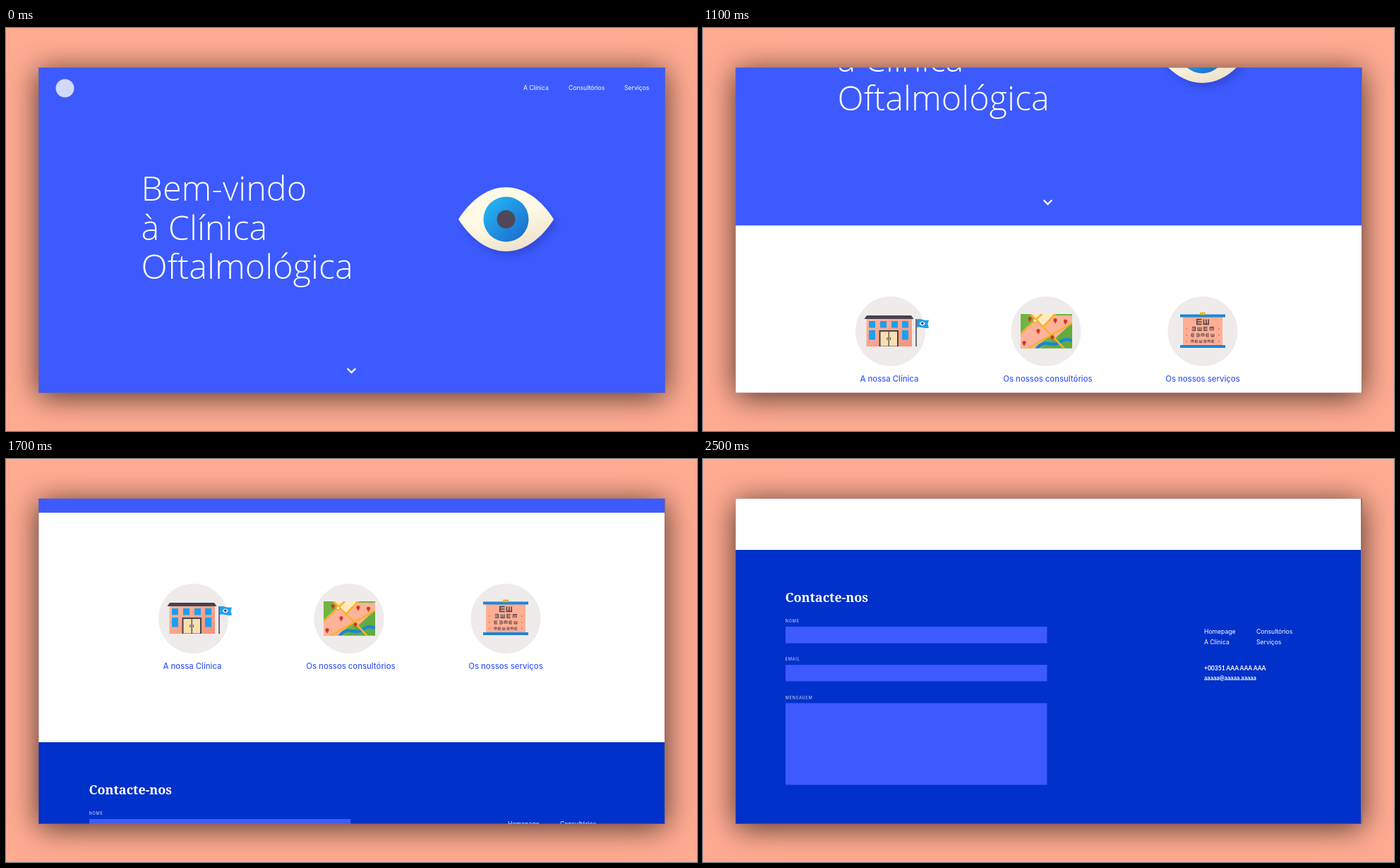
Animation, 979 px wide and 572 px high, one loop 3000 ms. Source, as an HTML page:

```html
<!DOCTYPE html>
<html lang="pt">
<head>
<meta charset="utf-8">
<title>Clínica Oftalmológica</title>
<style>
  html, body { margin: 0; width: 100%; height: 100%; overflow: hidden; background: #ffab91; }
  .window {
    position: absolute; left: 46px; top: 56px; width: 888px; height: 461.5px;
    background: #a87060; box-shadow: 0 5px 40px rgba(0, 0, 0, .7);
  }
  .view { position: absolute; inset: 0; overflow: hidden; }
  .view::after { content: ""; position: absolute; inset: 0; box-shadow: inset 0 0 0 1px rgba(150, 105, 95, .4); }
  .page {
    position: absolute; top: 0; left: 0; display: block;
    font-family: Inter, sans-serif; fill: #fff; animation: scroll 3s infinite;
  }
  @keyframes scroll {
    0%, 16.66% { top: 0; left: 0; animation-timing-function: steps(21, jump-start); }
    86.66%, 100% { top: -716px; left: -2px; }
  }
  .title { font: 300 48.5px "Open Sans", sans-serif; }
  .link { font-size: 8.6px; }
  .caption { font-size: 11.3px; font-weight: 500; fill: #3d5afe; text-anchor: middle; }
  .heading { font: 700 18px "Noto Serif", serif; }
  .label { font-size: 5.8px; letter-spacing: .65px; fill-opacity: .8; }
  .contact { font: 700 8.5px Lato, sans-serif; }
</style>
</head>
<body>
<div class="window"><div class="view">
<svg class="page" width="888" height="1178" viewBox="46 56 888 1178">
  <defs>
    <linearGradient id="white" x1=".3" y1="0" x2=".75" y2="1">
      <stop offset=".45" stop-color="#fffae6"/><stop offset="1" stop-color="#ecdfc6"/>
    </linearGradient>
    <linearGradient id="iris" x1=".1" y1=".1" x2=".9" y2=".9">
      <stop offset="0" stop-color="#22b4f4"/><stop offset="1" stop-color="#1c6fcd"/>
    </linearGradient>
    <linearGradient id="wall" x1="0" y1="0" x2="1" y2="1">
      <stop offset="0" stop-color="#ffb79f"/><stop offset="1" stop-color="#f4937c"/>
    </linearGradient>
    <filter id="soft" x="-20%" y="-20%" width="140%" height="150%"><feGaussianBlur stdDeviation="4.5"/></filter>
    <clipPath id="sheet"><rect x="450" y="202" width="73" height="48.5"/></clipPath>
    <path id="lens" d="M641 271.5C658 244.500 682 226 708.500 226S759 244.500 776 271.500C759 298.500 735 317 708.500 317S658 298.500 641 271.500Z"/>
    <path id="pin" d="M0 4C-1.200 1.500-2.700.500-2.700-1.200a2.700 2.700 0 0 1 5.400 0C2.700.500 1.200 1.500 0 4Z"/>
    <path id="glyph" d="M1-1H-1V1H1M-1 0H1" fill="none" stroke="#50444c" stroke-width=".48"/>
  </defs>

  <rect x="46" y="56" width="888" height="1178" fill="#fff"/>

  <rect x="46" y="56" width="888" height="463" fill="#3d5afe"/>
  <rect x="46" y="519" width="888" height="1" fill="#c9cde0"/>
  <circle cx="83.5" cy="85.500" r="13" fill="#d3d9f8"/>
  <g class="link">
    <text x="733" y="87.500">A Clínica</text>
    <text x="797" y="87.500">Consultórios</text>
    <text x="876" y="87.500">Serviços</text>
  </g>
  <g class="title">
    <text x="191.500" y="245">Bem-vindo</text>
    <text x="191.500" y="300.500">à Clínica</text>
    <text x="191.500" y="356">Oftalmológica</text>
  </g>
  <use href="#lens" x="5" y="7" fill="#1a2a98" opacity=".3" filter="url(#soft)"/>
  <use href="#lens" fill="url(#white)"/>
  <circle cx="708.500" cy="271.500" r="32" fill="url(#iris)"/>
  <circle cx="708.500" cy="271.500" r="13" fill="#50485a"/>
  <path d="M483.700 483.200L489.500 489L495.300 483.200" fill="none" stroke="#fff" stroke-width="2.300"/>

  <g transform="translate(1 443)">
    <g fill="#efebea">
      <circle cx="265.500" cy="226.500" r="49.500"/>
      <circle cx="486" cy="226.500" r="49.500"/>
      <circle cx="708" cy="226.500" r="49.500"/>
    </g>

    <path d="M231.500 208H296V248H231.500Z" fill="url(#wall)"/>
    <path d="M232 204H295L298.500 209H228.500Z" fill="#47424f"/>
    <g id="panes" fill="#1d9ff0"></g>
    <path d="M249.500 225H277V248H249.500Z" fill="#47424f"/>
    <path d="M251.500 227H262.600V247.500H251.500ZM263.900 227H275V247.500H263.900Z" fill="#f7dfb0"/>
    <path d="M261 235v4M265.500 235v4" stroke="#47424f"/>
    <path d="M302 209V248" stroke="#47424f" stroke-width="1.500"/>
    <path d="M303 209.500C309 207.500 313 212.500 320 210.200L318.500 216L320 221.500C313 223.500 309 219 303 221Z" fill="#1d9ff0"/>
    <path d="M306.500 215.500Q310.800 209.500 315 215.500Q310.800 221 306.500 215.500Z" fill="#fff"/>
    <circle cx="310.800" cy="215.300" r="1.700" fill="#38404e"/>

    <g clip-path="url(#sheet)">
      <rect x="450" y="202" width="73" height="49" fill="#6fb544"/>
      <path d="M474 208L495 229L470 251H450V232Z" fill="#fcb39a"/>
      <path d="M473 214L482 204H523V214L497 238Z" fill="#fcb39a"/>
      <path d="M464 202H497L482 220Z" fill="#fdeac0"/>
      <path d="M498 238L523 216V251H478Z" fill="#62ab3e"/>
      <path d="M472 252C484 235 494 250 504 243S515 238 525 240" fill="none" stroke="#1b86d8" stroke-width="4.500"/>
      <g fill="none" stroke="#fbb02d" stroke-width="2.600">
        <path d="M448 232L480 202M464 202L513 252M456 253L526 213M481 221L500 201"/>
      </g>
      <circle cx="470.500" cy="211.500" r="2.500" fill="#fff0cc" stroke="#fbb02d" stroke-width="1.500"/>
    </g>
    <g id="pins" fill="#dc4428"></g>

    <rect x="680" y="205" width="56" height="42" fill="#ffae94"/>
    <path d="M676 202.500H740V206.500H676ZM676 246H740V250H676Z" fill="#1b86d8"/>
    <rect x="704" y="199.500" width="8" height="3.800" rx="1" fill="#e5b81f"/>
    <g id="chart"></g>

    <g class="caption">
      <text x="264" y="298">A nossa Clínica</text>
      <text x="488.500" y="298">Os nossos consultórios</text>
      <text x="708" y="298">Os nossos serviços</text>
    </g>
  </g>

  <rect x="46" y="845" width="888" height="389" fill="#0031ca"/>
  <g transform="translate(2 716)">
    <text class="heading" x="116.500" y="202.500">Contacte-nos</text>
    <g class="label">
      <text x="116.500" y="232">NOME</text>
      <text x="116.500" y="286.300">EMAIL</text>
      <text x="116.500" y="340.500">MENSAGEM</text>
    </g>
    <path d="M117 238H487.500V261.500H117ZM117 292.300H487.500V315.500H117ZM117 346.500H487.500V462.500H117Z" fill="#3d5afe"/>
    <g class="link">
      <text x="710" y="247.500">Homepage</text>
      <text x="784" y="247.500">Consultórios</text>
      <text x="710" y="262.500">A Clínica</text>
      <text x="784" y="262.500">Serviços</text>
    </g>
    <g class="contact">
      <text x="710" y="300">+00351 AAA AAA AAA</text>
      <text x="710" y="314.300">aaaaa@aaaaa.aaaaa</text>
    </g>
  </g>
</svg>
</div></div>
<script>
  const fill = (id, parts) => { document.getElementById(id).innerHTML = parts.join(''); };

  const pane = (x, y, h) => `<rect x="${x}" y="${y}" width="9" height="${h}"/>`;
  fill('panes', [
    ...[235, 251, 267, 282].map(x => pane(x, 212, 9.5)),
    ...[235, 282].map(x => pane(x, 225, 13.5))
  ]);

  const pins = [[463, 210], [499, 212], [513.5, 213.5], [475, 227], [495, 236], [455, 244]];
  fill('pins', pins.map(([x, y]) =>
    `<use href="#pin" x="${x}" y="${y}"/><circle cx="${x}" cy="${y - 1.2}" r=".9" fill="#7c2a20"/>`));

  // Eye chart: one letter shape turned four ways.
  const turn = { E: 0, M: 90, A: 180, W: 270 };
  const rows = [['EW', 213, 3.4, 9.6], ['AWEM', 223, 2.4, 8.6], ['EAMEW', 232, 2, 7], ['MEWAME', 240.7, 1.7, 5.8]];
  fill('chart', rows.map(([word, y, size, gap], row) => {
    const letters = [...word].map((c, i) => {
      const x = 708 + (i - (word.length - 1) / 2) * gap;
      return `<use href="#glyph" transform="translate(${x} ${y}) rotate(${turn[c]}) scale(${size})"/>`;
    });
    const dots = row ? [685, 731].map(x => `<circle cx="${x}" cy="${y}" r="1" fill="#e0775f"/>`) : [];
    return [...letters, ...dots].join('');
  }));
</script>
</body>
</html>
```
